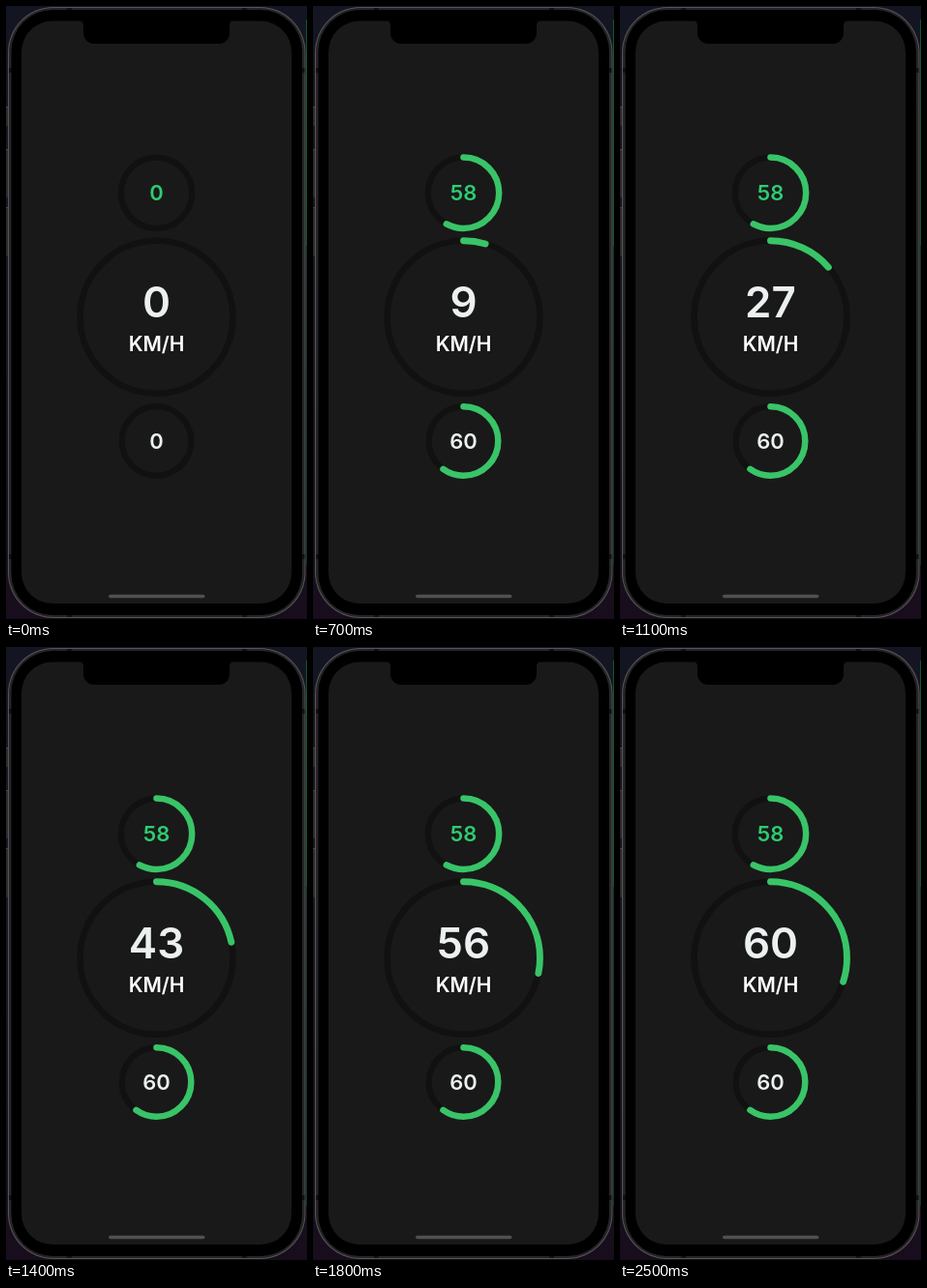
Write an HTML page with a canvas that moves like this. It is 311x634 px and loops after 2800 ms.

```html
<!DOCTYPE html>
<html lang="en">
<head>
<meta charset="utf-8">
<title>Speed gauges</title>
<style>
  html, body { margin: 0; width: 100%; height: 100%; overflow: hidden; background: #14141d; }
  canvas { display: block; width: 311px; height: 634px; }
</style>
</head>
<body>
<canvas id="stage"></canvas>
<script>
const W = 311, H = 634, LOOP = 2800, STEP = 100;
const FONT = 'Inter, Roboto, "Liberation Sans", sans-serif';
const GREEN = '#39c468', PALE = '#ecf0f1';

const canvas = document.getElementById('stage');
const ctx = canvas.getContext('2d');
const dpr = window.devicePixelRatio || 1;
canvas.width = W * dpr;
canvas.height = H * dpr;
ctx.scale(dpr, dpr);

// arcStart and textStart: when the ring and its number begin to move, in ms
const gauges = [
  { y: 193.3, r: 36.7, line: 6.2, goal: 58, max: 100, time: 500, arcStart: 116, textStart: 179,
    size: 22, base: 201, color: '#2ecc71' },
  { y: 321.7, r: 79, line: 6.6, goal: 60, max: 200, time: 2000, arcStart: 145, textStart: 145,
    size: 44, base: 322, color: PALE },
  { y: 450, r: 35.8, line: 6.2, goal: 60, max: 100, time: 500, arcStart: 166, textStart: 179,
    size: 22, base: 458, color: PALE }
];
const CX = 155.5;

function easeInOut(p) {
  p = Math.min(1, Math.max(0, p));
  return p < 0.5 ? 2 * p * p : 1 - 2 * (1 - p) * (1 - p);
}

function box(x, y, w, h, r, color) {
  ctx.beginPath();
  ctx.roundRect(x, y, w, h, r);
  ctx.fillStyle = color;
  ctx.fill();
}

function arc(g, turn, color, width) {
  ctx.beginPath();
  ctx.arc(CX, g.y, g.r, -Math.PI / 2, (turn - 0.25) * 2 * Math.PI);
  ctx.strokeStyle = color;
  ctx.lineWidth = width;
  ctx.lineCap = 'round';
  ctx.stroke();
}

function label(text, y, size, color) {
  ctx.font = `600 ${size}px ${FONT}`;
  ctx.textAlign = 'center';
  ctx.fillStyle = color;
  ctx.fillText(text, CX, y);
}

function drawPhone() {
  const back = ctx.createLinearGradient(0, 0, 0, H);
  back.addColorStop(0, '#141522');
  back.addColorStop(0.5, '#17171f');
  back.addColorStop(1, '#180d1c');
  ctx.fillStyle = back;
  ctx.fillRect(0, 0, W, H);
  box(310, 14, 1, 234, 0, '#0b5a2a');
  box(310, 248, 1, 330, 0, '#0c3a20');

  // side buttons
  for (const [y, h] of [[104, 20], [148, 50], [208, 51]]) {
    box(0, y, 4, h, 1, '#2c2c2e');
    box(0, y, 3, 1, 0, '#48484a');
  }

  // metal rim and bezel
  box(2, 1, 307.5, 632, 47, '#555557');
  box(3, 2, 305.5, 630, 46, '#252527');
  for (const x of [63, 244]) {
    box(x, 2, 5, 2, 0, '#111');
    box(x, 630, 5, 2, 0, '#111');
  }
  for (const y of [64, 567]) {
    box(3, y, 3, 5, 0, '#111');
    box(305.5, y, 3, 5, 0, '#111');
  }
  box(5.5, 4, 300.5, 626, 43, '#000');

  // screen, notch and home bar
  box(16, 15.5, 279, 602.5, 32, '#191919');
  box(80, 13, 151, 26, [0, 0, 11, 11], '#000');
  for (const [x, side] of [[80, -1], [231, 1]]) {
    ctx.beginPath();
    ctx.moveTo(x, 20);
    ctx.quadraticCurveTo(x, 15.5, x + side * 4.5, 15.5);
    ctx.lineTo(x, 15.5);
    ctx.fill();
  }
  box(106, 608.7, 99.5, 3.6, 1.8, '#505050');
}

function drawGauge(g, t) {
  const at = start => g.goal * easeInOut((t - start) / g.time);
  const value = at(g.arcStart);
  arc(g, 1, '#111', g.line);
  if (value > 0) arc(g, value / g.max, GREEN, g.line + 0.3);
  label(Math.floor(at(g.textStart)), g.base, g.size, g.color);
}

function frame(now) {
  const t = Math.floor((now % LOOP) / STEP) * STEP;
  drawPhone();
  gauges.forEach(g => drawGauge(g, t));
  label('KM/H', 357, 21, '#fff');
}

const begin = performance.now();
function tick() {
  frame(performance.now() - begin);
  requestAnimationFrame(tick);
}
tick();
</script>
</body>
</html>
```
